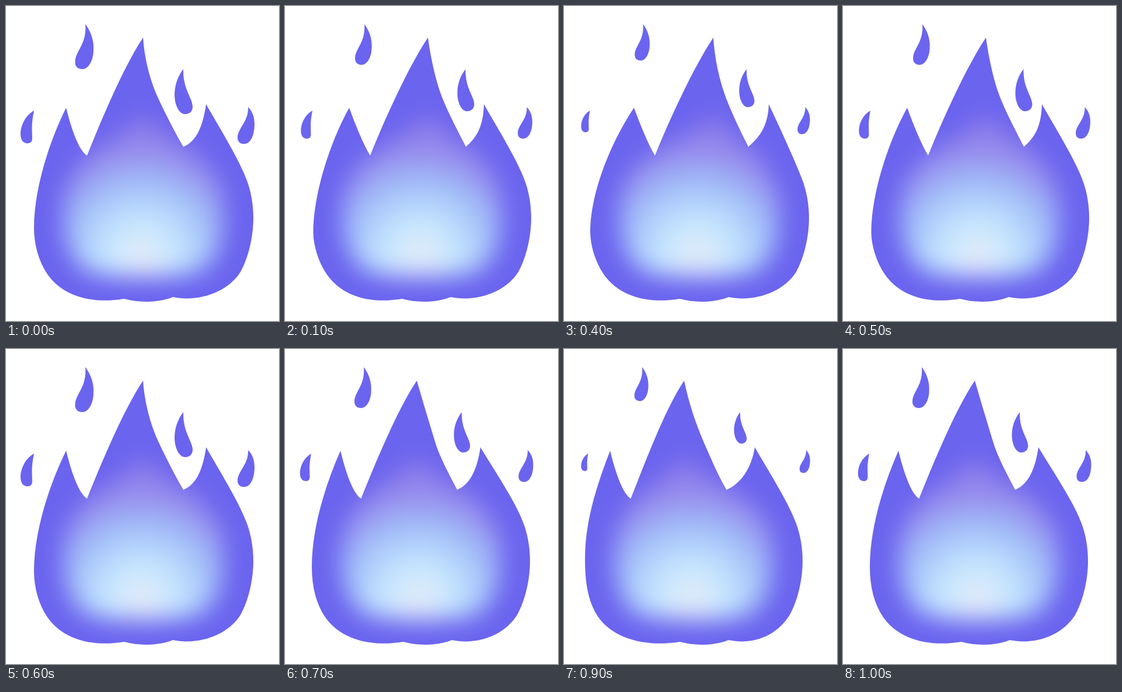
These frames come from a looping animation (468x539 px, 1100 ms). An HTML page:

```html
<!DOCTYPE html>
<html>
<head>
<meta charset="utf-8">
<style>
html, body { margin: 0; width: 100%; height: 100%; overflow: hidden; background: #fff; }
svg { display: block; }
</style>
</head>
<body>
<svg width="468" height="539" viewBox="0 0 468 539" fill="#6b64ef">
  <defs>
    <radialGradient id="light" gradientUnits="userSpaceOnUse" cx="230" cy="428" r="205">
      <stop offset="0" stop-color="#e4e8f5"/>
      <stop offset=".1" stop-color="#deeaf9"/>
      <stop offset=".28" stop-color="#c6e8ff"/>
      <stop offset=".63" stop-color="#a0bcf8"/>
      <stop offset=".84" stop-color="#9891ee"/>
      <stop offset="1" stop-color="#9080ea"/>
    </radialGradient>
    <filter id="soft" filterUnits="userSpaceOnUse" x="-60" y="40" width="600" height="560" color-interpolation-filters="sRGB">
      <feGaussianBlur stdDeviation="20"/>
    </filter>
    <clipPath id="inside"><path id="edge"/></clipPath>
  </defs>
  <path id="body"/>
  <g clip-path="url(#inside)"><path id="glow" fill="url(#light)" filter="url(#soft)"/></g>
  <g id="drops">
    <path d="M0 0C10 13 15 29 14 44C14 61 6 77-5 77C-14 77-18 71-17.5 64C-17 46 3 34 0 0"/>
    <path d="M0 0C-11 14-15 30-15 44C-15 60-8 77 3 77C12 77 16 71 16 64C15 48-1 34 0 0"/>
    <path d="M0 0C-15 8-23 26-23 40C-23 51-18 56-11 56C-5 56-3 52-3 47C-3 33-5 25 0 0"/>
    <path d="M0 0C8 8 11 18 11 29C11 47 5 63-7 63C-15 63-18 58-18 52C-18 36 1 25 0 0"/>
  </g>
</svg>
<script>
const $ = id => document.getElementById(id);
const STEP = 100;
const DROP_Y = [31, 108, 179, 173];

// spikes and valleys | left x, left y, right x, bottom notch | bend, curve of the tall tip | drops: x, scale
const rest  = [103, 139, 235, 304, 343, 48, 380, 424, 286, 1, 2, 261, 14, 14, 136, 1, 304, 1, 48, 1, 415, 1];
const right = [110, 146, 245, 310, 341, 48.5, 388, 422, 284, 0, 5, 270, 12, 12, 136, .905, 309.5, .935, 47, .857, 414.5, .857];
const far   = [120, 156, 256, 316, 351, 45, 387, 420, 282, 0, 2, 278, 11.5, 12, 135.5, .81, 313, .845, 44.5, .66, 413.5, .735];
const left  = [95, 130.5, 226, 295, 335, 46, 373, 420, 286, 1, 10, 257, 9, 12, 135, .91, 303, .896, 45, .84, 416, .865];
const out   = [79, 114.5, 206, 278.5, 327, 36, 360, 409, 282, 1, 7, 239, 13, 14, 134, .755, 302, .70, 41.5, .53, 415, .62];

const mix = (p, q, k) => p.map((v, i) => v + (q[i] - v) * k);
const poses = [rest, right, far, mix(right, far, 2), far, right, rest,
               left, mix(left, out, .5), out, left];

function flame([a, v, t, w, r, L, ly, R, b, bend, d, m, s, e]) {
  const n = b - 83.5, pick = (x, y) => x + (y - x) * bend;
  return `M${a} 174
    C${a + pick(11, 8)} ${pick(204, 206)} ${v - pick(12, 15)} ${pick(236, 247)} ${v} 256
    C${v + 24} 196 ${t - 34} 105 ${t} 54
    C${t + d} 89 ${m - s} 128 ${m} 158
    C${m + s} 188 ${w - e} 217 ${w} 241
    C${w + pick(20, 23)} ${pick(224, 232)} ${r - pick(1, 5)} 204 ${r} 168
    C${r + .38 * (R - 12 - r)} 214 ${R - 27} 258 ${R - 12} 296
    C${R - 4} 316 ${R} 340 ${R} 363
    C${R} 396 ${R - 9} 432 ${R - 22} 455
    C${R - 44} 490 ${b + 44} 507 ${b} 498
    C${b - 24} 508 ${n + 25} 508 ${n} 501
    C${n - 53} 510 ${L + 50} 498 ${L + 23} 459
    C${L + 8} 437 ${L} 408 ${L} ${ly}
    C${L} ${ly - 65} ${a - .56 * (a - L)} 237 ${a} 174Z`;
}

function core([, , t, , , L, , R]) {
  return `M${t} 185
    C${t + 35} 225 ${R - 75} 250 ${R - 56} 310
    C${R - 40} 360 ${R - 52} 440 ${R - 95} 455
    C290 467 180 467 ${L + 95} 455
    C${L + 52} 440 ${L + 40} 360 ${L + 56} 310
    C${L + 75} 250 ${t - 35} 225 ${t} 185Z`;
}

function draw(pose) {
  const d = flame(pose);
  $('body').setAttribute('d', d);
  $('edge').setAttribute('d', d);
  $('glow').setAttribute('d', core(pose));
  $('light').setAttribute('cx', (pose[5] + pose[7]) / 2 - 4);
  [...$('drops').children].forEach((drop, i) => {
    const [x, scale] = pose.slice(14 + 2 * i);
    drop.setAttribute('transform', `translate(${x} ${DROP_Y[i]}) scale(${scale})`);
  });
}

let start;
function tick(now) {
  start ??= now;
  draw(poses[Math.floor((now - start) / STEP) % poses.length]);
  requestAnimationFrame(tick);
}
draw(rest);
requestAnimationFrame(tick);
</script>
</body>
</html>
```
